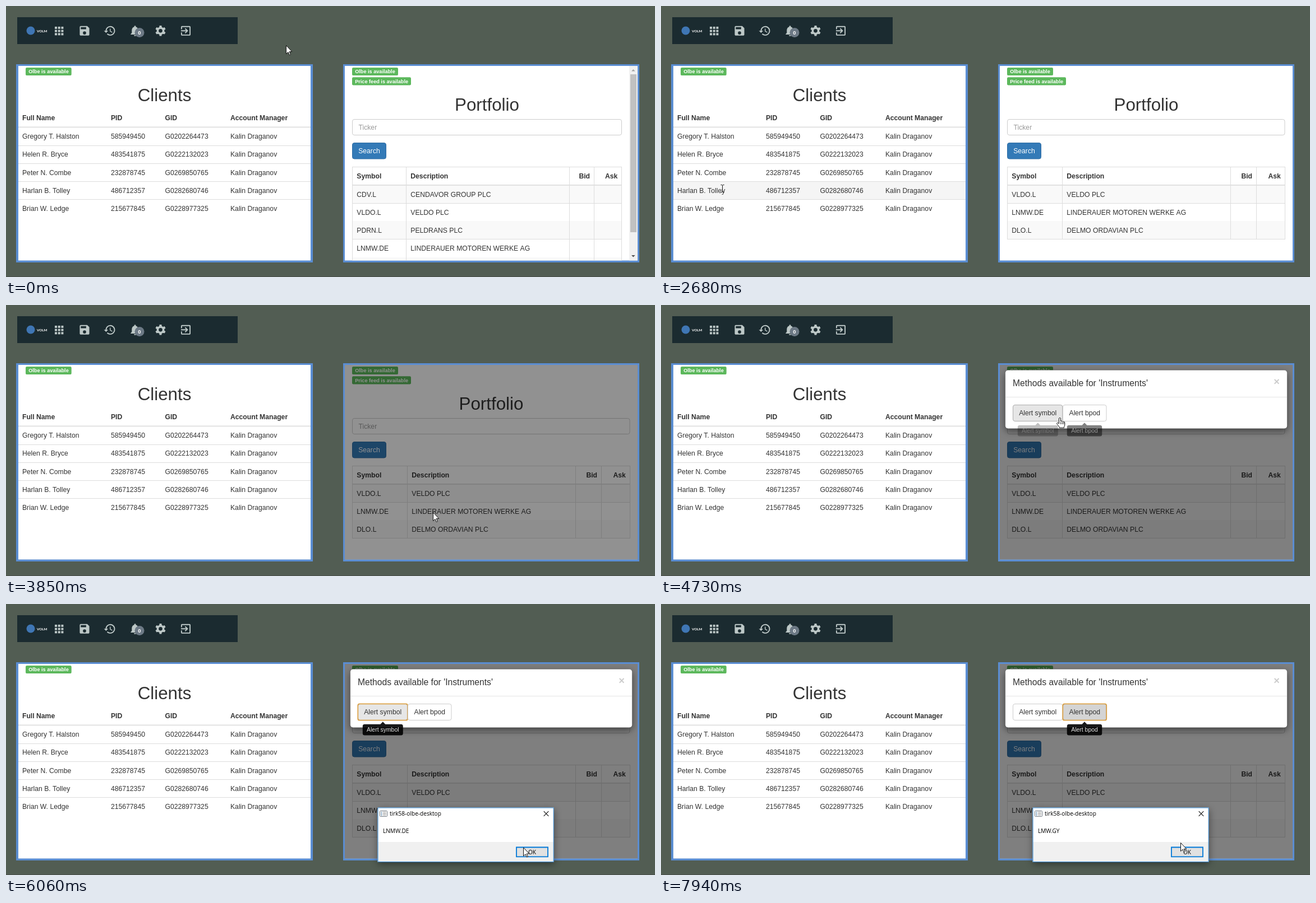
An HTML page with a canvas that plays this animation: 1157x484 px, repeating every 8 s.

```html
<!DOCTYPE html>
<html lang="en">
<head>
<meta charset="utf-8">
<title>Clients and portfolio</title>
<style>
html, body { margin: 0; width: 100%; height: 100%; overflow: hidden; background: #525d53; }
canvas { display: block; width: 1157px; height: 484px; }
</style>
</head>
<body>
<canvas id="stage"></canvas>
<script>
const W = 1157, H = 484, LOOP = 8000;
const canvas = document.getElementById('stage');
const dpr = window.devicePixelRatio || 1;
canvas.width = W * dpr;
canvas.height = H * dpr;
const g = canvas.getContext('2d');

const SANS = '"Liberation Sans", Arial, sans-serif';
const SYSTEM = '"Open Sans", "Noto Sans", sans-serif';
const BODY = `12.18px ${SANS}`;
const BOLD = `bold 12.18px ${SANS}`;
const LABEL = `bold 9.13px ${SANS}`;
const TITLE = `31.32px ${SANS}`;
const ROW = 32.15;

const clients = [
  ['Gregory T. Halston', '585949450', 'G0202264473'],
  ['Helen R. Bryce', '483541875', 'G0222132023'],
  ['Peter N. Combe', '232878745', 'G0269850765'],
  ['Harlan B. Tolley', '486712357', 'G0282680746'],
  ['Brian W. Ledge', '215677845', 'G0228977325']
];
const manager = 'Kalin Draganov';

const cendavor = ['CDV.L', 'CENDAVOR GROUP PLC'];
const veldo = ['VLDO.L', 'VELDO PLC'];
const peldrans = ['PDRN.L', 'PELDRANS PLC'];
const linderauer = ['LNMW.DE', 'LINDERAUER MOTOREN WERKE AG'];
const delmo = ['DLO.L', 'DELMO ORDAVIAN PLC'];

// Cursor path: time, x, y, shape on arrival
const path = [
  [0, 499, 70, 'arrow'], [70, 499, 70, 'arrow'], [860, 89, 270, 'arrow'],
  [930, 88, 272, 'arrow'], [1000, 88, 274, 'none'], [1490, 88, 275, 'none'],
  [1600, 88, 275, 'arrow'], [1880, 107, 319, 'arrow'], [2030, 107, 319, 'arrow'],
  [2500, 109.5, 326, 'none'], [2720, 109.5, 326, 'beam'], [3310, 758, 375, 'arrow'],
  [3460, 761, 370, 'arrow'], [4100, 761, 370, 'arrow'], [4550, 742, 214, 'arrow'],
  [4690, 713, 202, 'hand'], [4730, 711, 201, 'hand'], [4960, 694, 196, 'hand'],
  [5280, 694, 196, 'hand'], [5900, 922, 434.5, 'arrow'], [6250, 922, 434.5, 'arrow'],
  [6760, 800, 212, 'arrow'], [6860, 790, 203, 'arrow'], [6930, 779, 196, 'hand'],
  [7300, 777, 196, 'hand'], [7640, 864, 348, 'arrow'], [7940, 926, 426, 'arrow'],
  [8000, 926, 426, 'arrow']
];

const within = (t, a, b) => t >= a && t < b;
const ease = p => p * p * (3 - 2 * p);

function track(t, keys) {
  if (t <= keys[0][0]) return keys[0][1];
  for (let i = 1; i < keys.length; i++) {
    const [a, u] = keys[i - 1], [b, v] = keys[i];
    if (t <= b) return u + (v - u) * (t - a) / (b - a);
  }
  return keys[keys.length - 1][1];
}

function cursorAt(t) {
  const i = path.findIndex(k => t < k[0]);
  const [a, x, y] = path[i - 1], [b, u, v, shape] = path[i];
  const p = ease((t - a) / (b - a));
  return { x: x + (u - x) * p, y: y + (v - y) * p, shape };
}

function rect(x, y, w, h, color) {
  g.fillStyle = color;
  g.fillRect(x, y, w, h);
}

function box(x, y, w, h, r, fill, line, lw = 1) {
  g.beginPath();
  g.roundRect(x, y, w, h, r);
  if (fill) { g.fillStyle = fill; g.fill(); }
  if (line) { g.strokeStyle = line; g.lineWidth = lw; g.stroke(); }
}

function text(s, x, y, font = BODY, color = '#333', align = 'left') {
  g.font = font;
  g.fillStyle = color;
  g.textAlign = align;
  g.fillText(s, x, y);
}

function faded(alpha, draw) {
  if (alpha <= 0) return;
  g.save();
  g.globalAlpha *= alpha;
  draw();
  g.restore();
}

function shadow(color, blur, dy, draw) {
  g.save();
  g.shadowColor = color;
  g.shadowBlur = blur * dpr;
  g.shadowOffsetY = dy * dpr;
  draw();
  g.restore();
}

const icons = {
  save: new Path2D('M17 3H5c-1.1 0-2 .9-2 2v14c0 1.1.9 2 2 2h14c1.1 0 2-.9 2-2V7zM12 19a3 3 0 1 1 0-6 3 3 0 0 1 0 6zM15 9H5V5h10z'),
  history: new Path2D('M13 3a9 9 0 0 0-9 9H1l4 4 4-4H6a7 7 0 1 1 2 5l-1.4 1.4A9 9 0 1 0 13 3zM12 8v5l4.3 2.5.7-1.2-3.5-2.1V8z'),
  bell: new Path2D('M12 22a2 2 0 0 0 2-2h-4a2 2 0 0 0 2 2zM18 16v-5c0-3-1.6-5.6-4.5-6.3V4a1.5 1.5 0 0 0-3 0v.7C7.6 5.4 6 8 6 11v5l-2 2v1h16v-1z'),
  exit: new Path2D('M10.1 15.6 11.5 17l5-5-5-5-1.4 1.4 2.6 2.6H3v2h9.7zM19 3H5a2 2 0 0 0-2 2v4h2V5h14v14H5v-4H3v4c0 1.1.9 2 2 2h14c1.1 0 2-.9 2-2V5c0-1.1-.9-2-2-2z')
};

function gear() {
  const p = new Path2D();
  p.arc(12, 12, 7.3, 0, Math.PI * 2);
  p.arc(12, 12, 3.5, 0, Math.PI * 2, true);
  for (let i = 0; i < 6; i++) {
    const a = i * Math.PI / 3 - Math.PI / 2;
    const at = (r, d) => [12 + r * Math.cos(a + d), 12 + r * Math.sin(a + d)];
    p.moveTo(...at(6.6, -.39));
    p.lineTo(...at(10, -.2));
    p.lineTo(...at(10, .2));
    p.lineTo(...at(6.6, .39));
    p.closePath();
  }
  return p;
}
icons.gear = gear();

function icon(name, cx, cy = 44.3, scale = .95) {
  g.save();
  g.translate(cx, cy);
  g.scale(scale, scale);
  g.translate(-12, -12);
  g.fillStyle = '#bdc8c7';
  g.fill(icons[name]);
  g.restore();
}

function circle(x, y, r, color) {
  g.beginPath();
  g.arc(x, y, r, 0, Math.PI * 2);
  g.fillStyle = color;
  g.fill();
}

function toolbar() {
  rect(20, 20, 393, 48, '#1b2b30');
  circle(44, 44, 7.5, '#3f76b4');
  text('VOLM', 55, 47, 'bold 6.3px Lato, sans-serif', '#fff');
  for (let i = 0; i < 9; i++) {
    rect(87 + i % 3 * 5.7, 36.9 + Math.floor(i / 3) * 5.7, 4, 4, '#bdc8c7');
  }
  icon('save', 140);
  icon('history', 185);
  icon('bell', 230);
  icon('gear', 275.5);
  icon('exit', 320.5);
  circle(238, 47.5, 8.5, '#6c7985');
  text('0', 238, 51, `bold 9.5px ${SANS}`, '#fff', 'center');
}

function frame(left, right, x, w) {
  rect(left, 104, right - left, 354, '#5a8dd2');
  rect(x, 107, w, 347.5, '#fff');
}

function badge(s, x, y, w) {
  box(x, y, w, 14.2, 2.2, '#5cb85c');
  text(s, x + 5.2, y + 10.4, LABEL, '#fff');
}

function clientPanel(cursor) {
  frame(18, 547, 22, 521);
  badge('Olbe is available', 35, 109.9, 81.7);
  text('Clients', 282.5, 170, TITLE, '#333', 'center');
  const cols = [29, 187, 283.5, 400];
  ['Full Name', 'PID', 'GID', 'Account Manager'].forEach((s, i) => text(s, cols[i], 204.2, BOLD));
  rect(22, 215.5, 521, 1.7, '#ddd');
  clients.forEach((row, i) => {
    const top = Math.round(216.5 + ROW * i);
    if (cursor.x < 543 && cursor.y >= top && cursor.y < top + 32) {
      rect(22, top + (i ? 1 : 0), 521, 31, '#f5f5f5');
    }
    if (i) rect(22, top, 521, 1, '#ddd');
    [...row, manager].forEach((s, c) => text(s, cols[c], 237.3 + ROW * i));
  });
}

function scrollbar() {
  rect(1111, 107, 15, 348, '#f1f1f1');
  rect(1113, 122, 11, 282, '#c1c1c1');
  const arrow = (y, d, color) => {
    g.beginPath();
    g.moveTo(1115, y);
    g.lineTo(1121.6, y);
    g.lineTo(1118.3, y + d);
    g.fillStyle = color;
    g.fill();
  };
  arrow(116.5, -3.5, '#a3a3a3');
  arrow(445, 3.5, '#505050');
}

function portfolio(t) {
  const long = t < 1490;
  const right = long ? 1098 : 1112.5;
  const cols = long ? [617, 713, 1004, 1048] : [617, 715, 1015, 1061];
  const rows = long ? [cendavor, veldo, peldrans, linderauer, delmo]
    : [t < 2350 ? peldrans : veldo, linderauer, delmo];
  badge('Olbe is available', 617, 109.9, 82);
  badge('Price feed is available', 617, 127.2, 105);
  text('Portfolio', long ? 857.5 : 865, 187.2, TITLE, '#333', 'center');
  box(617.5, 202.5, right - 618, 28, 3.5, '#fff', '#ccc');
  text('Ticker', 628.5, 220.8, BODY, '#999');
  box(617.5, 244.5, 60, 28.5, 3.5, '#337ab7', '#2e6da4');
  text('Search', 647.5, 263.2, BODY, '#fff', 'center');

  const end = Math.round(320 + ROW * rows.length);
  rows.forEach((row, i) => {
    const top = Math.round(320 + ROW * i);
    if (i % 2 === 0) rect(617, top, right - 617, 32, '#f9f9f9');
    row.forEach((s, c) => text(s, cols[c] + 8.3, 340.8 + ROW * i));
    rect(617, Math.round(320 + ROW * (i + 1)), right - 617, 1, '#ddd');
  });
  rect(617, 287, right - 617, 1, '#ddd');
  rect(617, 319, right - 617, 1.7, '#ddd');
  [...cols, Math.ceil(right) - 1].forEach(x => rect(x, 287, 1, end - 286, '#ddd'));
  text('Symbol', cols[0] + 8.3, 307.6, BOLD);
  text('Description', cols[1] + 8.3, 307.6, BOLD);
  text('Bid', cols[3] - 7, 307.6, BOLD, '#333', 'right');
  text('Ask', right - 7.7, 307.6, BOLD, '#333', 'right');
  if (long) scrollbar();
}

const looks = {
  normal: ['#fff', '#ccc'],
  hover: ['#e6e6e6', '#adadad'],
  focus: ['#e6e6e6', '#8c8c8c'],
  active: ['#d4d4d4', '#8c8c8c']
};

function button(s, x, w, look) {
  const [fill, line] = looks[look];
  box(x + .5, 178.5, w - 1, 29, 3.5, fill, line);
  if (look === 'focus' || look === 'active') box(x + .3, 178.3, w - .6, 29.4, 3, null, '#dca34a', 1.8);
  text(s, x + w / 2, 197.2, BODY, '#333', 'center');
}

function tip(s, cx, w, alpha) {
  faded(alpha, () => {
    g.beginPath();
    g.roundRect(cx - w / 2, 214.7, w, 19.8, 3.5);
    g.moveTo(cx, 210.3);
    g.lineTo(cx + 4.4, 214.7);
    g.lineTo(cx - 4.4, 214.7);
    g.closePath();
    g.fillStyle = '#000';
    g.fill();
    text(s, cx, 228, `10.44px ${SANS}`, '#fff', 'center');
  });
}

function modal(t) {
  const p = Math.min(1, Math.max(0, (t - 3900) / 270));
  const slide = -26 * (1 - p) ** 2;
  faded(track(t, [[3900, 0], [4040, 1]]), () => {
    g.translate(0, slide);
    shadow('rgba(0,0,0,.5)', 13, 4.4, () => box(613.7, 116.3, 502.6, 104.4, 5, '#fff'));
    box(613.7, 116.3, 502.6, 104.4, 5, null, 'rgba(0,0,0,.25)');
    text("Methods available for 'Instruments'", 627, 145, `15.66px ${SANS}`);
    text('×', 1097.7, 143, `bold 18.27px ${SANS}`, '#ccc', 'center');
    rect(614, 164, 502, 1, '#e5e5e5');
    const first = within(t, 5100, 7180) ? 'focus' : within(t, 4690, 5100) ? 'hover' : 'normal';
    const second = t >= 7180 ? 'active'
      : within(t, 4590, 4690) || within(t, 6880, 7180) ? 'hover' : 'normal';
    button('Alert symbol', 627, 89.3, first);
    button('Alert bpod', 716, 78.5, second);
    tip('Alert symbol', 671.8, 72, track(t, [[4690, 0], [4840, .9], [7200, .9], [7340, 0]]));
    tip('Alert bpod', 755, 62.5, track(t, [[4570, 0], [4690, .7], [4830, 0], [6890, 0], [7040, .9]]));
  });
}

function dialog(message) {
  shadow('rgba(0,0,0,.45)', 12, 3, () => rect(662.5, 363.5, 314, 97.5, '#fff'));
  rect(663, 425, 313, 35.5, '#f0f0f0');
  box(663, 364, 313.2, 96.6, 0, null, '#2a82cf');
  box(666.5, 369.5, 13, 10, 1, '#fff', '#6f7780');
  for (let i = 0; i < 3; i++) {
    rect(668.5, 371.5 + i * 2.5, 2, 1.4, '#4f7fa8');
    rect(672, 371.5 + i * 2.5, 5.5, 1, '#888');
  }
  const font = `10.1px ${SYSTEM}`;
  text('tirk58-olbe-desktop', 684, 378.3, font, '#000');
  g.beginPath();
  g.moveTo(958.7, 370.2);
  g.lineTo(967.3, 378.8);
  g.moveTo(967.3, 370.2);
  g.lineTo(958.7, 378.8);
  g.strokeStyle = '#111';
  g.lineWidth = 1.1;
  g.stroke();
  text(message, 672, 409.3, font, '#000');
  box(910, 434.5, 56, 16.8, 0, '#e1e1e1', '#0078d7', 1.8);
  text('OK', 938, 446.5, font, '#000', 'center');
}

const pointers = {
  arrow: new Path2D('M.5 .5V15.6L4 12.3 6.3 17.5 8.4 16.6 6.2 11.5H10.8Z'),
  hand: new Path2D('M-1.5 1.3Q0-.7 1.5 1.3V6.6Q3 5.4 4.2 7 5.7 6 6.8 7.7 8.5 7 8.8 9V13Q8.8 15 7.6 16.4V18.3H-.8V17L-5 11.6Q-6 9.6-4.4 9.2-3 9-1.5 11Z')
};

function drawCursor({ x, y, shape }) {
  if (shape === 'none') return;
  g.save();
  g.translate(x, y);
  if (shape === 'beam') {
    rect(-3, -7, 2.6, 1, '#222');
    rect(.6, -7, 2.6, 1, '#222');
    rect(-.5, -6, 1.1, 12, '#222');
    rect(-3, 6, 2.6, 1, '#222');
    rect(.6, 6, 2.6, 1, '#222');
  } else {
    g.fillStyle = '#fff';
    g.strokeStyle = '#111';
    g.lineWidth = 1;
    g.lineJoin = 'round';
    g.fill(pointers[shape]);
    g.stroke(pointers[shape]);
    if (shape === 'hand') for (let i = 0; i < 3; i++) rect(1.2 + i * 2.6, 8, .9, 4, '#111');
  }
  g.restore();
}

function clickRing(x, y) {
  g.beginPath();
  g.arc(x, y, 9, 0, Math.PI * 2);
  g.strokeStyle = 'rgba(70,160,215,.6)';
  g.lineWidth = 2.5;
  g.stroke();
}

function draw(t) {
  const cursor = cursorAt(t);
  g.setTransform(dpr, 0, 0, dpr, 0, 0);
  rect(0, 0, W, H, '#525d53');
  rect(0, 483, W, 1, '#484f49');
  toolbar();
  clientPanel(cursor);
  frame(601, 1129, 604, 522);
  g.save();
  g.beginPath();
  g.rect(604, 107, 522, 347.5);
  g.clip();
  portfolio(t);
  rect(604, 107, 522, 348, `rgba(0,0,0,${track(t, [[3730, 0], [3870, .5]])})`);
  modal(t);
  g.restore();
  if (within(t, 5180, 6200)) faded(track(t, [[5180, .3], [5280, 1]]), () => dialog('LNMW.DE'));
  if (t >= 7230) faded(track(t, [[7230, .3], [7330, 1]]), () => dialog('LMW.GY'));
  if (within(t, 1000, 1170)) clickRing(87.5, 273.5);
  if (within(t, 2200, 2350)) clickRing(107.5, 324.5);
  if (within(t, 3540, 3620)) clickRing(761.5, 370.5);
  drawCursor(cursor);
}

const start = performance.now();
function tick() {
  draw((performance.now() - start) % LOOP);
  requestAnimationFrame(tick);
}
tick();
</script>
</body>
</html>
```
